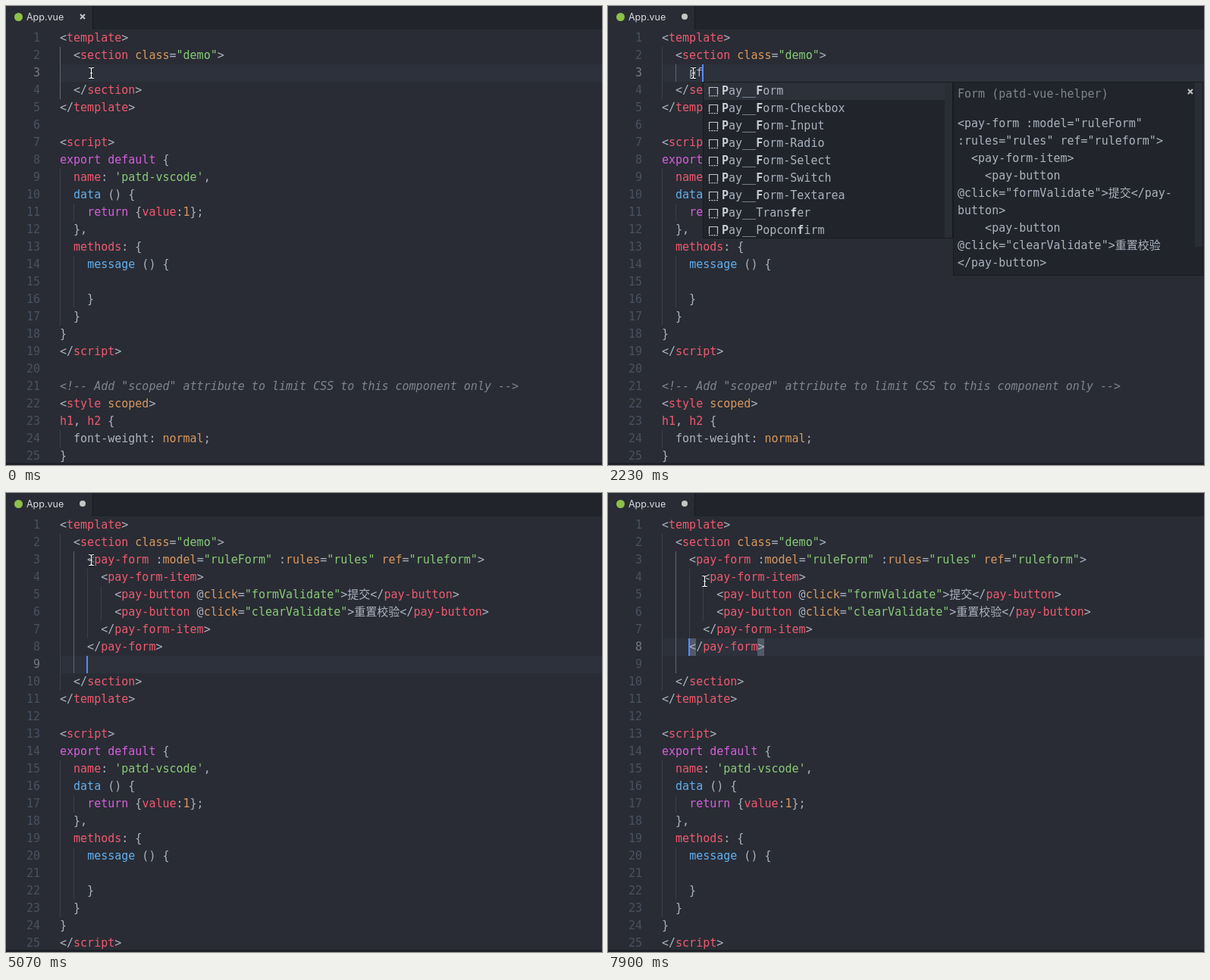
An HTML page for the animation above (8 s loop, 786 by 606 pixels).

```html
<!DOCTYPE html>
<html lang="en">
<head>
<meta charset="utf-8">
<title>Snippet completion</title>
<style>
  html, body { margin: 0; width: 100%; height: 100%; overflow: hidden; background: #292c34; }
  #stage {
    position: relative; width: 786px; height: 606px; overflow: hidden;
    background: #292c34; color: #abb2bf;
    font: 15px/23px "DejaVu Sans Mono", "Noto Sans CJK SC", "Noto Sans CJK", monospace;
    font-variant-ligatures: none;
  }
  #stage div, #stage svg { position: absolute; box-sizing: border-box; }
  .line { white-space: pre; height: 23px; }
  .num { left: 0; width: 45px; text-align: right; color: #495162; }
  .num.on { color: #737984; }
  .guide { width: 1px; background: #3b4048; }
  .guide.on { background: #62666d; }
  .r { color: #ef596f; }
  .g { color: #89ca78; }
  .o { color: #d8985f; }
  .u { color: #61afef; }
  .p { color: #d55fde; }
  .c { color: #7f848e; font-style: italic; }
  .b { color: #c9cdd4; font-weight: bold; }
  .hl { left: 71px; right: 0; height: 23px; background: #2d313b; }
  .bracket { width: 9px; height: 23px; background: #515a6b; }
  .box { background: #21252b; border: 1px solid #181a1f; overflow: hidden; }
  .sel { left: 0; right: 0; top: 0; height: 23px; background: #2c313a; }
  .bar { width: 10px; }
  .title { color: #7f848e; }
  #caret { width: 2px; height: 23px; background: #528bff; }
  #tabs { left: 0; top: 0; width: 786px; height: 31px; background: #21252b; }
  #tab { left: 0; top: 0; width: 115px; height: 31px; background: #292c34; border-right: 1px solid #181a1f; }
  #name { left: 27px; top: 3px; color: #d7dae0; font: 12.5px/23px Inter, sans-serif; }
  #logo { left: 11px; top: 9px; width: 11px; height: 11px; border-radius: 50%; background: #8dc149; }
  #dot { left: 97px; top: 10px; width: 8px; height: 8px; border-radius: 50%; background: #c5c5c5; }
  #foot { left: 0; top: 603px; width: 786px; height: 3px; background: #1f2128; }
</style>
</head>
<body>
<div id="stage"></div>
<script>
const CH = 9.03, ROW = 23, LEFT = 71, TOP = 31, LOOP = 8000;
const stage = document.getElementById('stage');
const rowY = n => TOP + (n - 1) * ROW;
const colX = c => Math.round(LEFT + c * CH);
const esc = s => s.replace(/&/g, '&amp;').replace(/</g, '&lt;');
// "~rtext~" colours text with class r
const paint = s => s.split('~').map((part, i) =>
  i % 2 ? `<span class="${part[0]}">${esc(part.slice(1))}</span>` : esc(part)).join('');

function add(parent, cls, css = {}, html = '') {
  const el = document.createElement('div');
  el.className = cls;
  for (const k in css) el.style[k] = typeof css[k] === 'number' ? css[k] + 'px' : css[k];
  el.innerHTML = html;
  parent.append(el);
  return el;
}
const show = (el, on) => { el.style.visibility = on ? 'inherit' : 'hidden'; };
const layer = () => add(stage, 'layer', { left: 0, top: 0, width: 786, height: 606 });

const head = ['<~rtemplate~>', '  <~rsection~ ~oclass~=~g"demo"~>'];
const tail = `  </~rsection~>
</~rtemplate~>

<~rscript~>
~pexport default~ {
  ~rname~: ~g'patd-vscode'~,
  ~udata~ () {
    ~preturn~ {~rvalue~:~o1~};
  },
  ~rmethods~: {
    ~umessage~ () {

    }
  }
}
</~rscript~>

~c<!-- Add "scoped" attribute to limit CSS to this component only -->~
<~rstyle~ ~oscoped~>
~rh1~, ~rh2~ {
  font-weight: ~onormal~;
}`.split('\n');
const form = `    <~rpay-form~ :~omodel~=~g"ruleForm"~ :~orules~=~g"rules"~ ~oref~=~g"ruleform"~>
      <~rpay-form-item~>
        <~rpay-button~ @~oclick~=~g"formValidate"~>提交</~rpay-button~>
        <~rpay-button~ @~oclick~=~g"clearValidate"~>重置校验</~rpay-button~>
      </~rpay-form-item~>
    </~rpay-form~>
`.split('\n');

// guides: [column, first row, last row]
function codeView(body, guides) {
  const view = layer(), shift = body.length - 1;
  [...head, ...body, ...tail].slice(0, 25).forEach((s, i) =>
    add(view, 'line', { left: LEFT, top: rowY(i + 1) }, paint(s)));
  const script = [[0, 9, 17], [2, 11, 11], [2, 14, 16], [0, 24, 24]]
    .map(([c, a, b]) => [c, a + shift, b + shift]);
  [...guides, ...script].filter(g => g[1] <= 25).forEach(g => addGuide(view, g));
  return view;
}
function addGuide(view, [col, a, b], cls = '') {
  return add(view, 'guide ' + cls, { left: colX(col), top: rowY(a), height: (b - a + 1) * ROW });
}

const hl = add(stage, 'hl');
const brackets = [4, 14].map(c => add(stage, 'bracket', { left: colX(c), top: rowY(8) }));
const before = codeView([''], [[0, 2, 4]]);
const after = codeView(form, [[0, 2, 10], [4, 4, 7], [6, 5, 6]]);
addGuide(after, [2, 3, 9], 'on');
const idleGuide = addGuide(before, [0, 2, 4], 'on');
const typeGuide = addGuide(before, [2, 3, 3], 'on');
const typed = add(before, 'line', { left: colX(4), top: rowY(3) });
const nums = Array.from({ length: 25 }, (_, i) => add(stage, 'line num', { top: rowY(i + 1) }, i + 1));
const caret = add(stage, '');
caret.id = 'caret';

const icons = {
  wrench: `<path d="M1.8 12.2 8 6" stroke="#c5c5c5" stroke-width="3" stroke-linecap="round"/>
    <path d="M13.3 3.2 10.8 5.6 8.6 5.2 8.2 3 10.6.6A4.2 4.2 0 0 0 5.6 6 4.2 4.2 0 0 0 8.4 8.6 4.2 4.2 0 0 0 13.3 3.2Z" fill="#c5c5c5"/>`,
  snippet: `<path d="M1.5 11V1.5H12.5V11" fill="none" stroke="#c5c5c5" stroke-width="1.2"/>
    <path d="M1 12.6H13" stroke="#c5c5c5" stroke-width="1.4" stroke-dasharray="2 1.3"/>`
};
const cross = (x, y) => `<svg style="left:${x - 4}px;top:${y - 4}px" width="8" height="8">
  <path d="M1 1 7 7M7 1 1 7" stroke="#c5c5c5" stroke-width="2"/></svg>`;

function menu(x, items, h, thumb) {
  const box = add(stage, 'box', { left: x, top: 100, width: 330, height: h });
  add(box, 'sel');
  items.forEach(([icon, text], i) => {
    add(box, '', { left: 6, top: i * ROW + 5, width: 14, height: 14 },
      `<svg style="left:0;top:0" width="14" height="14">${icons[icon]}</svg>`);
    add(box, 'line', { left: 24, top: i * ROW }, paint(text));
  });
  add(box, 'bar', { right: 0, top: 0, ...thumb });
  return box;
}
function detail(x, h, title, lines, size) {
  const box = add(stage, 'box', { left: x, top: 100, width: 330, height: h });
  add(box, 'line title', { left: 5, top: 4 }, title);
  lines.forEach((s, i) => add(box, 'line', { left: 5, top: 43 + i * ROW, fontSize: size }, esc(s)));
  add(box, '', { left: 0, top: 0 }, cross(312, 12));
  return box;
}

const tags = ['', 'aram', 'ic', 'icture', 'laintext', 're', 'rog'].map(s => ['wrench', '~bp~' + s]);
const parts = ['Alert', 'Badge', 'Breadcrumbs', 'Button', 'Card'].map(s => ['snippet', '~bP~ay__' + s]);
const forms = ['', '-Checkbox', '-Input', '-Radio', '-Select', '-Switch', '-Textarea']
  .map(s => '~bF~orm' + s).concat('Trans~bf~er', 'Popcon~bf~irm')
  .map(s => ['snippet', '~bP~ay__' + s]);

const popups = [
  null,
  [menu(116, [...tags, ...parts], 276, { height: 59, background: '#3a3f4a' }),
   detail(446, 72, 'Emmet Abbreviation', ['<p>|</p>'], 13.5)],
  [menu(125, forms, 207, { height: 205, background: '#292d36' }),
   detail(455, 256, 'Form (patd-vue-helper)', [
     '<pay-form :model="ruleForm"', ':rules="rules" ref="ruleform">', '  <pay-form-item>',
     '    <pay-button', '@click="formValidate">提交</pay-', 'button>',
     '    <pay-button', '@click="clearValidate">重置校验', '</pay-button>'], 15)]
];
add(popups[2][1], 'bar', { right: 0, top: 0, height: 217, background: '#292d36' });

const tabs = add(stage, '', {}, `<div id="tab"><div id="logo"></div><div id="name">App.vue</div>
  <div id="dot"></div><div id="close">${cross(101, 14)}</div></div>`);
tabs.id = 'tabs';
add(stage, '').id = 'foot';
const dot = document.getElementById('dot'), close = document.getElementById('close');

const mouse = add(stage, '', { left: 0, top: 0, width: 9, height: 17 },
  `<svg style="left:0;top:0" width="9" height="17" fill="none">
   <path id="beam" d="M1 1.5H2.5Q4.5 1.5 4.5 3.5V13.5Q4.5 15.5 2.5 15.5H1M8 1.5H6.5Q4.5 1.5 4.5 3.5M4.5 13.5Q4.5 15.5 6.5 15.5H8M3 8.5H6" stroke="#15171b" stroke-width="2.6"/>
   <use href="#beam"/><path d="M1 1.5H2.5Q4.5 1.5 4.5 3.5V13.5Q4.5 15.5 2.5 15.5H1M8 1.5H6.5Q4.5 1.5 4.5 3.5M4.5 13.5Q4.5 15.5 6.5 15.5H8M3 8.5H6" stroke="#fff" stroke-width="1.2"/></svg>`);

// scenes: [caret row, caret column, typed text]
const scenes = [[3, 4, ''], [3, 5, 'p'], [3, 6, 'pf'], [9, 4, ''], [8, 4, '']];
// steps: [start, scene]
const steps = [[0, 0], [450, 1], [1190, 2], [4180, 3], [5820, 4]];
const blinks = [150, 890, 1190, 1630, 2230, 2680, 3130, 3730, 4180, 4630, 5070, 5670, 5820, 6270, 6720, 7320, 7750];
const path = [[0, 112, 88], [6870, 108, 76], [7020, 100, 63], [7170, 96, 59],
  [7320, 104, 74], [7470, 117, 98], [7620, 126, 115], [7900, 127, 116]];
const last = (list, t) => list.filter(s => s[0] <= t).pop();

function draw(t) {
  const n = last(steps, t)[1], [row, col, text] = scenes[n];
  show(before, n < 3);
  show(after, n > 2);
  show(idleGuide, n === 0);
  show(typeGuide, n === 1 || n === 2);
  typed.textContent = text;
  popups.forEach((p, i) => p && p.forEach(el => show(el, i === n)));
  brackets.forEach(el => show(el, n === 4));
  show(close, n === 0);
  show(dot, n > 0);
  hl.style.top = rowY(row) + 'px';
  nums.forEach((el, i) => el.classList.toggle('on', i + 1 === row));
  caret.style.left = colX(col) - 1 + 'px';
  caret.style.top = rowY(row) + 'px';
  show(caret, blinks.filter(b => b <= t).length % 2);
  const [, x, y] = last(path, t);
  mouse.style.transform = `translate(${x - 4}px, ${y - 8}px)`;
}
function tick() {
  draw(performance.now() % LOOP);
  requestAnimationFrame(tick);
}
tick();
</script>
</body>
</html>
```
